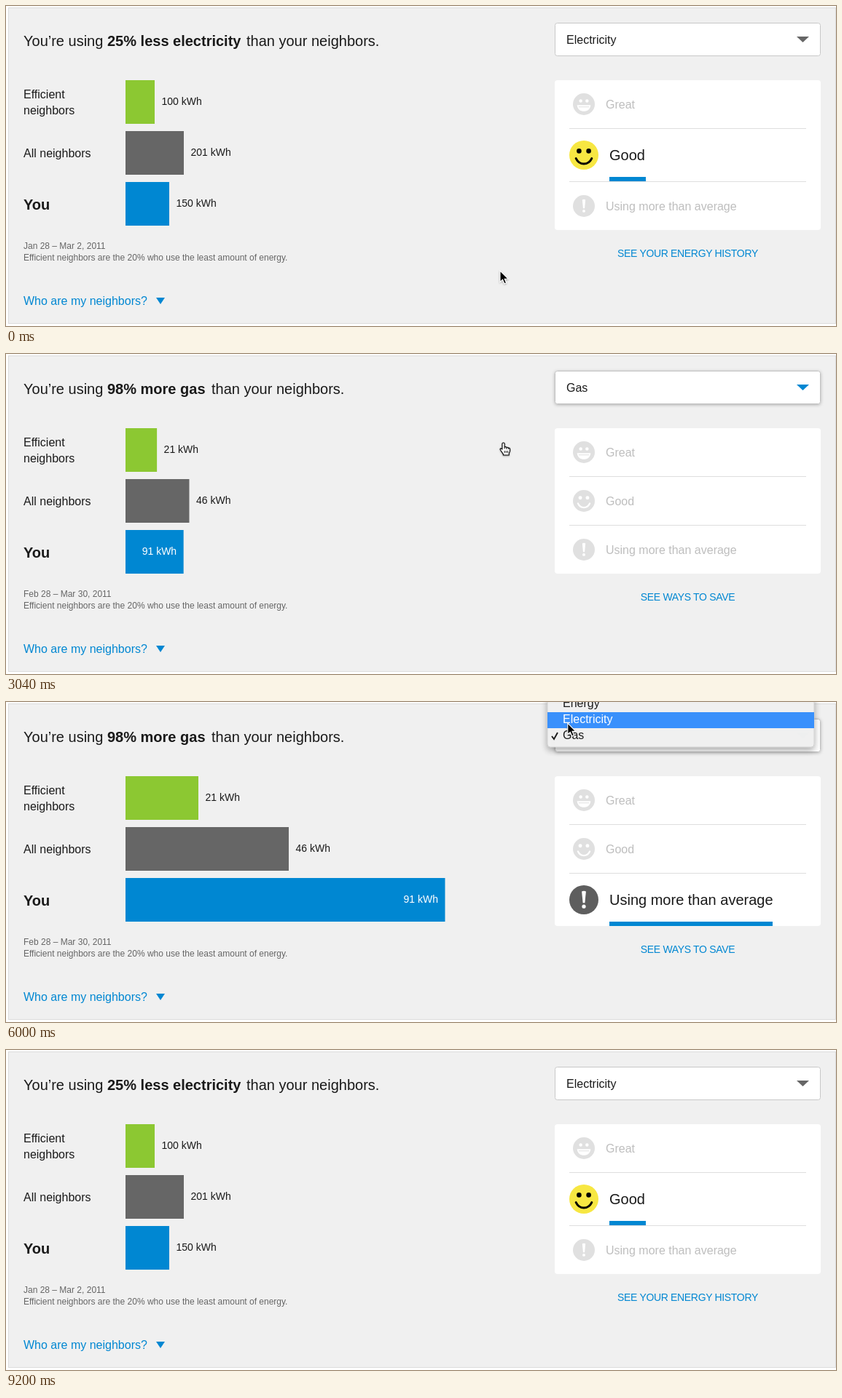
Recreate the animation shown at these times as an HTML page. Size 1139 by 440 pixels, loop 9.3 s.

```html
<!DOCTYPE html>
<html lang="en">
<head>
<meta charset="utf-8">
<title>Energy comparison</title>
<style>
  html, body { margin: 0; width: 100%; height: 100%; overflow: hidden; background: #fff; }
  svg { display: block; width: 1139px; height: 440px; font-family: "Liberation Sans", Arial, sans-serif; }
  text { white-space: pre; }
</style>
</head>
<body>
<svg viewBox="0 0 1139 440">
  <defs>
    <filter id="soft" x="-10%" y="-40%" width="120%" height="200%">
      <feDropShadow dx="0" dy="1" stdDeviation="2" flood-opacity=".28"/>
    </filter>
    <filter id="deep" x="-10%" y="-40%" width="120%" height="200%">
      <feDropShadow dx="0" dy="4" stdDeviation="5" flood-opacity=".35"/>
    </filter>
    <filter id="tip" x="-50%" y="-50%" width="200%" height="200%">
      <feDropShadow dx="0" dy="1" stdDeviation=".8" flood-opacity=".35"/>
    </filter>
  </defs>
  <rect x="3.5" y="2.5" width="1135" height="434" fill="#f0f0f0" stroke="#dcdcdc"/>
  <g id="scene"></g>
</svg>
<script>
const LOOP = 9300;
const INK = '#1a1a1a', BLUE = '#0087d2';
const scene = document.getElementById('scene');

const views = {
  electric: {
    name: 'Electricity', claim: '25% less electricity', tailX: 330,
    kwh: [100, 201, 150], dates: 'Jan 28 – Mar 2, 2011', link: 'SEE YOUR ENERGY HISTORY'
  },
  gas: {
    name: 'Gas', claim: '98% more gas', tailX: 282,
    kwh: [21, 46, 91], dates: 'Feb 28 – Mar 30, 2011', link: 'SEE WAYS TO SAVE'
  }
};
const bars = [
  { y: 102, color: '#8cc832', small: 40, big: 100 },
  { y: 172, color: '#666666', small: 80, big: 224 },
  { y: 242, color: BLUE, small: 60, big: 438.5 }
];
const options = ['Energy', 'Electricity', 'Gas'];

// time, x, y of the pointer tip
const path = [
  [470, 678, 364], [720, 672, 255], [920, 715, 130], [1120, 772, 50],
  [1700, 772, 49], [1920, 770.5, 65.5], [2280, 770.5, 65.5], [2540, 720, 92],
  [2800, 682.5, 122], [4490, 683, 122], [4960, 773, 62], [5490, 773, 61],
  [5640, 771, 29], [6000, 771, 29], [6300, 715, 68], [6600, 660.5, 121],
  [6920, 680, 338], [7190, 680.5, 345], [7890, 680.5, 345], [8000, 680, 373]
];

const clamp = (v, a = 0, b = 1) => Math.min(b, Math.max(a, v));
const lerp = (a, b, k) => a + (b - a) * k;
const swing = k => .5 - Math.cos(Math.PI * k) / 2;
const phase = (t, a, b) => swing(clamp((t - a) / (b - a)));
// value held between evenly spaced steps from first to last
const stepped = (t, start, first, last, count) => {
  if (t < first) return 0;
  const gap = (last - first) / (count - 1);
  const n = Math.min(count - 1, Math.floor((t - first) / gap + .001));
  return phase(first + n * gap, start, last);
};
const mix = (a, b, k) => 'rgb(' + a.map((v, i) => Math.round(lerp(v, b[i], k))) + ')';

const text = (x, y, s, size = 16, fill = INK, more = '') =>
  `<text x="${x}" y="${y}" font-size="${size}" fill="${fill}" ${more}>${s}</text>`;
const rect = (x, y, w, h, fill, more = '') =>
  `<rect x="${x}" y="${y}" width="${w}" height="${h}" fill="${fill}" ${more}/>`;

function pointerAt(t) {
  if (t <= path[0][0]) return path[0].slice(1);
  for (let i = 1; i < path.length; i++) {
    const a = path[i - 1], b = path[i];
    if (t <= b[0]) {
      const k = (t - a[0]) / (b[0] - a[0]);
      return [lerp(a[1], b[1], k), lerp(a[2], b[2], k)];
    }
  }
  return path[path.length - 1].slice(1);
}

function chart(view, grow) {
  let out = text(24, 55, 'You’re using', 20)
    + text(139, 55, view.claim, 20, INK, 'font-weight="700"')
    + text(view.tailX, 55, 'than your neighbors.', 20)
    + text(24, 127, 'Efficient') + text(24, 149, 'neighbors')
    + text(24, 208, 'All neighbors')
    + text(24, 280, 'You', 20, INK, 'font-weight="700"');
  bars.forEach((b, i) => {
    const w = lerp(b.small, b.big, grow);
    const inside = i === 2 && view === views.gas;
    out += rect(164, b.y, w, 60, b.color)
      + text(164 + w + (inside ? -9.5 : 9.5), b.y + 34, view.kwh[i] + ' kWh', 14,
        inside ? '#fff' : INK, inside ? 'text-anchor="end"' : '');
  });
  return out
    + text(24, 334, view.dates, 12, '#666')
    + text(24, 350, 'Efficient neighbors are the 20% who use the least amount of energy.', 12, '#666')
    + text(24, 411, 'Who are my neighbors?', 16, BLUE)
    + `<path d="M206 401h12l-6 9z" fill="${BLUE}"/>`;
}

function select(name, active) {
  return rect(753.5, 23.5, 364, 45, '#fff',
      `rx="3" stroke="${active ? '#c2c2c2' : '#c8c8c8'}" ${active ? 'filter="url(#soft)"' : ''}`)
    + text(769, 52, name)
    + `<path d="M1085 42h17l-8.5 8z" fill="${active ? BLUE : '#666'}"/>`;
}

// faces are drawn for a radius of 20
const faces = [
  ink => `<circle cx="-5.8" cy="-6" r="2.9" fill="${ink}"/><circle cx="5.8" cy="-6" r="2.9" fill="${ink}"/>
    <path d="M-12.5 1.5H12.5C11.5 9 6.5 13 0 13S-11.5 9-12.5 1.5z" fill="${ink}"/>
    <path d="M-9.5 5H9.5" stroke="#e0e0e0" stroke-width="1.4"/>`,
  (ink, wink) => `<circle cx="-6.6" cy="-5.6" r="3.3" fill="${ink}"/>
    <ellipse cx="6.6" cy="-5.6" rx="3.3" ry="${wink ? .9 : 3.3}" fill="${ink}"/>
    <path d="M-10.8 4.6C-6 14.5 6 14.5 10.8 4.6" fill="none" stroke="${ink}" stroke-width="3" stroke-linecap="round"/>`,
  () => `<path d="M-2.9-11.5Q0-13.2 2.9-11.5L1.4 4.2H-1.4z" fill="#fff"/><circle cy="9.2" r="2.6" fill="#fff"/>`
];
const GREY = [224, 224, 224];
const rows = [
  { label: 'Great', hue: GREY, ink: [255, 255, 255], width: 52 },
  { label: 'Good', hue: [247, 231, 66], ink: [0, 0, 0], width: 50 },
  { label: 'Using more than average', hue: [94, 94, 94], ink: [255, 255, 255], width: 224 }
];

function rating(open, link, wink) {
  const extra = 6 * (open[1] + open[2]);
  let out = rect(753, 102, 365, 200 + extra, '#fff', 'rx="4"'), top = 102;
  rows.forEach((r, i) => {
    const k = open[i], bottom = top + 66 + 6 * k, mid = top + 33 + 3 * k;
    out += `<g transform="translate(793 ${mid}) scale(${lerp(.75, 1, k)})">
        <circle r="20" fill="${mix(GREY, r.hue, k)}"/>${faces[i](mix([255, 255, 255], r.ink, k), wink)}</g>`
      + text(lerp(823, 828, k), mid + lerp(6, 7, k), r.label, lerp(16, 20, k),
        mix([190, 190, 190], [26, 26, 26], k));
    if (k) out += rect(828, bottom - 6 * k, r.width, 6 * k, BLUE);
    if (i < 2) out += rect(773, bottom, 325, 1, '#dedede');
    top = bottom + 1;
  });
  return out + text(935.5, 339 + extra, link, 14, BLUE, 'text-anchor="middle" letter-spacing="-.33"');
}

function menu(chosen, y, alpha) {
  const top = 36 - 22 * chosen;
  const hot = clamp(Math.floor((y - top) / 22), 0, 2);
  let out = rect(743, top - 4, 366, 74, '#f0f0f0',
    'rx="4" stroke="#bdbdbd" stroke-width=".6" filter="url(#deep)"');
  options.forEach((s, i) => {
    const cy = top + 22 * i, ink = i === hot ? '#fff' : INK;
    if (i === hot) out += rect(743, cy, 366, 22, '#3890fc');
    out += text(764, cy + 15, s, 16, ink);
    if (i === chosen)
      out += `<path d="M749 ${cy + 11}l3 4 5-9" fill="none" stroke="${ink}" stroke-width="1.9"/>`;
  });
  return `<g opacity="${alpha}">${out}</g>`;
}

function pointer(x, y, hand) {
  const shape = hand
    ? `<path d="M-1.6 1.6a1.6 1.6 0 0 1 3.2 0V6q1.6-.9 2.7.5 1.6-.7 2.5.6 2.2-.2 2.2 1.9V11.6L7.7 14.5V17H-.2V15.6L-3.9 10.2Q-5.2 8.2-3.6 7.8L-1.6 9z"
        fill="#fff" stroke="#000" stroke-width="1.1" stroke-linejoin="round"/>
       <path d="M1.6 6V8.5M4.3 6.5V9M6.8 7.1V9.2M1.6 11V14M3.8 11V14M6 11V14" stroke="#000" stroke-width=".9"/>`
    : `<path d="M0 0V15.4L3.5 12.2 5.9 17.8 8.6 16.7 6.2 11.2H11z" fill="#000" stroke="#fff" stroke-width="1.1"/>`;
  return `<g transform="translate(${x} ${y})" filter="url(#tip)">${shape}</g>`;
}

function draw(t) {
  const within = (a, b) => t >= a && t < b;
  const view = within(2400, 6130) ? views.gas : views.electric;
  const grow = t < 6000 ? stepped(t, 2980, 3040, 3390, 7) : 1 - stepped(t, 6780, 6830, 7190, 8);
  const good = t < 2400 ? 1 : stepped(t, 7500, 7550, 7720, 4);
  const over = t < 6130 ? stepped(t, 3740, 3810, 3950, 3) : 0;
  const [x, y] = pointerAt(t);

  let out = chart(view, grow)
    + select(view.name, within(1050, 9200))
    + rating([0, good, over], view.link, within(7950, 8250));
  if (within(1250, 2400)) out += menu(1, y, 1 - clamp((t - 2280) / 120));
  if (within(5260, 6130)) out += menu(2, y, 1 - clamp((t - 6000) / 130));
  if (t < 8010)
    out += pointer(x, y, within(1070, 1250) || within(2280, 5260) || within(6130, 6290));
  scene.innerHTML = out;
}

const begin = performance.now();
function tick() {
  draw((performance.now() - begin) % LOOP);
  requestAnimationFrame(tick);
}
tick();
</script>
</body>
</html>
```
